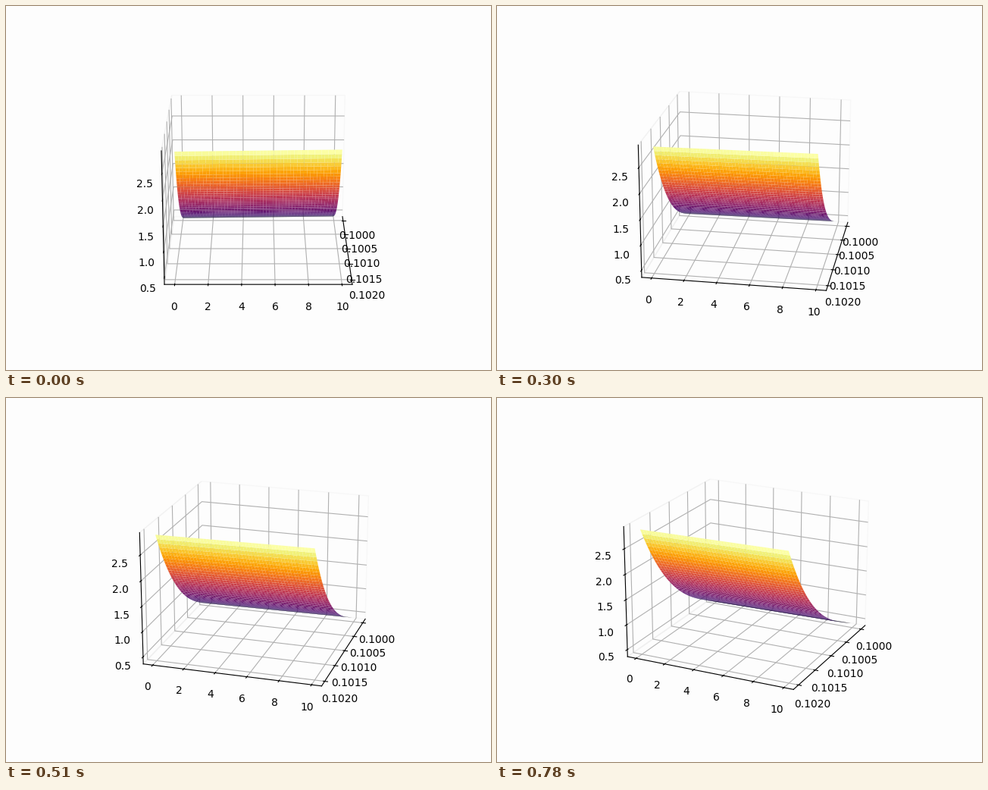
Animation, 640 px wide and 480 px high, one loop 810 ms. Source, as a matplotlib script:

```python
import numpy as np
import matplotlib.pyplot as plt
from matplotlib.animation import FuncAnimation

FRAMES = 27
INTERVAL = 30
BACKGROUND = "#fdfdfd"
X_RANGE = (0.1, 0.102)
Y_RANGE = (0.1, 9.9)
Z_RANGE = (0.4076, 2.876)


def padded(bounds, margin):
    """Widen bounds by a data margin, then by the box margin of 1/48."""
    low, high = bounds
    for part in (margin, 1 / 48):
        extra = (high - low) * part
        low, high = low - extra, high + extra
    return low, high


def surface(cells=50, tilt=0.015):
    """Valley wall: nearly straight at the back, steep at the front."""
    u = np.linspace(0, 1, cells)[:, None]
    v = np.linspace(0, 1, cells)[None, :]
    wall = 0.48 * u + 0.52 * u**3.2
    height = (1 - tilt) * wall + tilt * v
    x = X_RANGE[0] + np.ptp(X_RANGE) * u + 0 * v
    y = Y_RANGE[0] + np.ptp(Y_RANGE) * v + 0 * u
    z = Z_RANGE[0] + np.ptp(Z_RANGE) * height
    return x, y, z


plt.rcParams["font.family"] = "DejaVu Sans"
fig = plt.figure(figsize=(6.4, 4.8), dpi=100, facecolor=BACKGROUND)
ax = fig.add_subplot(projection="3d", facecolor=BACKGROUND)
ax.plot_surface(*surface(), cmap="inferno", linewidth=0, antialiased=True)

ax.set_xlim(*padded(X_RANGE, 0.05))
ax.set_ylim(*padded(Y_RANGE, 0.05))
ax.set_zlim(*padded(Z_RANGE, 0))
ax.set_xticks(np.linspace(0.1, 0.102, 5))
ax.set_yticks(np.arange(0, 11, 2))
ax.set_zticks(np.arange(0.5, 2.6, 0.5))

for axis, digits in ((ax.xaxis, 4), (ax.yaxis, 0), (ax.zaxis, 1)):
    axis.set_major_formatter(f"{{x:.{digits}f}}")
    axis.pane.fill = False


def update(frame):
    # The tiny offset keeps the choice of side pane stable at zero azimuth.
    ax.view_init(elev=20, azim=frame + 0.001)
    return []


anim = FuncAnimation(fig, update, frames=FRAMES, interval=INTERVAL,
                     init_func=lambda: update(0), repeat=True, repeat_delay=0)
plt.show()
```
